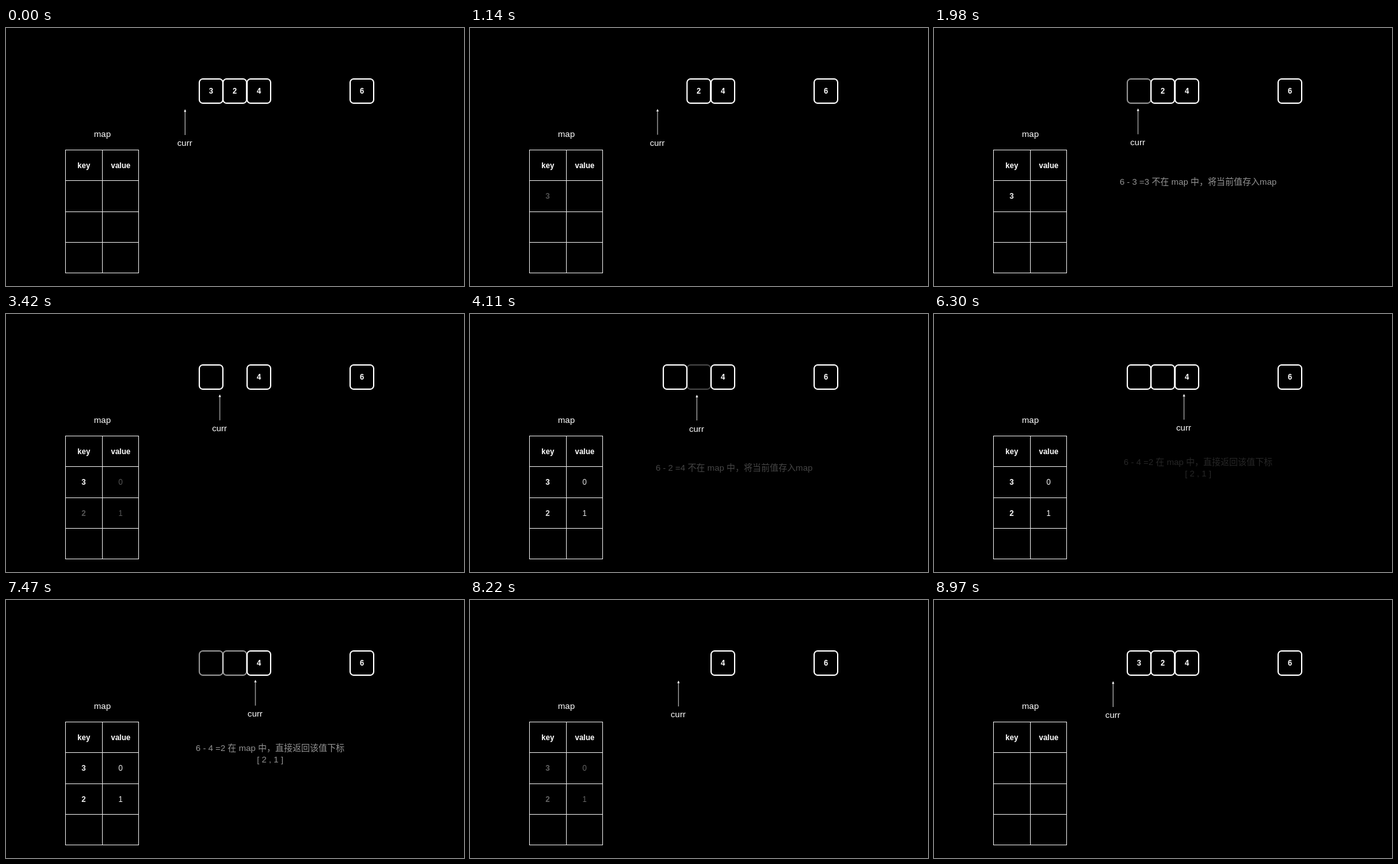
An HTML page with a canvas that plays this animation: 720x405 px, repeating every 9000 ms.

```html
<!DOCTYPE html>
<html lang="zh-CN">
<head>
<meta charset="utf-8">
<style>
html, body { margin: 0; width: 100%; height: 100%; overflow: hidden; background: #000; }
canvas { display: block; }
</style>
</head>
<body>
<canvas id="stage" width="720" height="405"></canvas>
<script>
const ctx = document.getElementById('stage').getContext('2d');
const FAMILY = '"Liberation Sans", "Noto Sans CJK SC", sans-serif';
const PERIOD = 2250, HOLD = 450;

// Pointer position per step: x centre and vertical shift
const pointer = [[281, 0], [322.5, -1.3], [360.4, -0.8], [398, -2.3]];

// [text, x, baseline, weight, first step in which it is shown]
const cells = [
  ['3', 122, 268.3, 'bold', 1],
  ['0', 180, 268.3, 'normal', 2],
  ['2', 122, 317, 'bold', 2],
  ['1', 180, 317, 'normal', 2],
];

// [digit, x centre, last step in which the digit is shown]
const boxes = [['3', 322.4, 0], ['2', 359.7, 1], ['4', 397.5, 3], ['6', 559.5, 3]];

// Notes per step: [text, baseline] lines
const notes = [
  [],
  [['6 - 3 =3 不在 map 中，将当前值存入map', 245.5]],
  [['6 - 2 =4 不在 map 中，将当前值存入map', 245.5]],
  [['6 - 4 =2 在 map 中，直接返回该值下标', 237.3], ['[ 2 , 1 ]', 255.3]],
];

const clamp = v => Math.min(1, Math.max(0, v));
const ease = v => (1 - Math.cos(Math.PI * clamp(v))) / 2;
const mix = (a, b, k) => a + (b - a) * k;

function text(str, x, y, size = 13.6, weight = 'normal') {
  ctx.font = `${weight} ${size}px ${FAMILY}`;
  ctx.fillText(str, x, y);
}

function line(x1, y1, x2, y2) {
  ctx.beginPath();
  ctx.moveTo(x1, y1);
  ctx.lineTo(x2, y2);
  ctx.stroke();
}

function drawBox(x, digit) {
  ctx.lineWidth = 2;
  ctx.beginPath();
  ctx.roundRect(x - 18.5, 80, 37, 38, 5.5);
  ctx.stroke();
  text(digit, x, 103.3, 12, 'bold');
}

function drawTable() {
  ctx.lineWidth = 1;
  ctx.strokeStyle = '#e4e4e4';
  for (const x of [93.5, 151.5, 208.5]) line(x, 191, x, 385);
  for (const y of [191.5, 239.5, 288.5, 336.5, 384.5]) line(93, y, 209, y);
  ctx.strokeStyle = '#fff';
  text('map', 151.5, 171.3);
  text('key', 122.3, 219.8, 12, 'bold');
  text('value', 180.3, 219.8, 12, 'bold');
}

function drawPointer(x, dy) {
  ctx.save();
  ctx.translate(x, dy);
  ctx.lineWidth = 1;
  ctx.strokeStyle = '#d0d0d0';
  line(0.5, 130, 0.5, 168);
  ctx.beginPath();
  ctx.moveTo(0.5, 127.5);
  ctx.lineTo(2.4, 131.5);
  ctx.lineTo(-1.4, 131.5);
  ctx.fill();
  text('curr', 0, 185.4);
  ctx.restore();
}

function render(time) {
  const t = time % (4 * PERIOD);
  const from = Math.floor(t / PERIOD), to = (from + 1) % 4;
  const p = clamp((t % PERIOD - HOLD) / (PERIOD - HOLD));
  const move = ease(p), fadeOut = 1 - ease(p * 3), fadeIn = ease(p * 3 - 2);

  ctx.globalAlpha = 1;
  ctx.fillStyle = '#000';
  ctx.fillRect(0, 0, 720, 405);
  ctx.fillStyle = ctx.strokeStyle = '#fff';
  ctx.textAlign = 'center';

  drawTable();
  for (const [str, x, y, weight, first] of cells) {
    ctx.globalAlpha = mix(+(from >= first), +(to >= first), move);
    text(str, x, y, 12, weight);
  }

  for (const [digit, x, last] of boxes) {
    const before = from <= last ? digit : '', after = to <= last ? digit : '';
    ctx.globalAlpha = before === after ? 1 : fadeOut;
    drawBox(x, before);
    if (before !== after) {
      ctx.globalAlpha = fadeIn;
      drawBox(x, after);
    }
  }

  for (const [step, alpha] of [[from, fadeOut], [to, fadeIn]]) {
    ctx.globalAlpha = alpha;
    for (const [str, y] of notes[step]) text(str, 415.2, y);
  }

  ctx.globalAlpha = 1;
  drawPointer(...pointer[from].map((v, i) => mix(v, pointer[to][i], move)));
}

const start = performance.now();
function tick() {
  render(performance.now() - start);
  requestAnimationFrame(tick);
}
tick();
</script>
</body>
</html>
```
